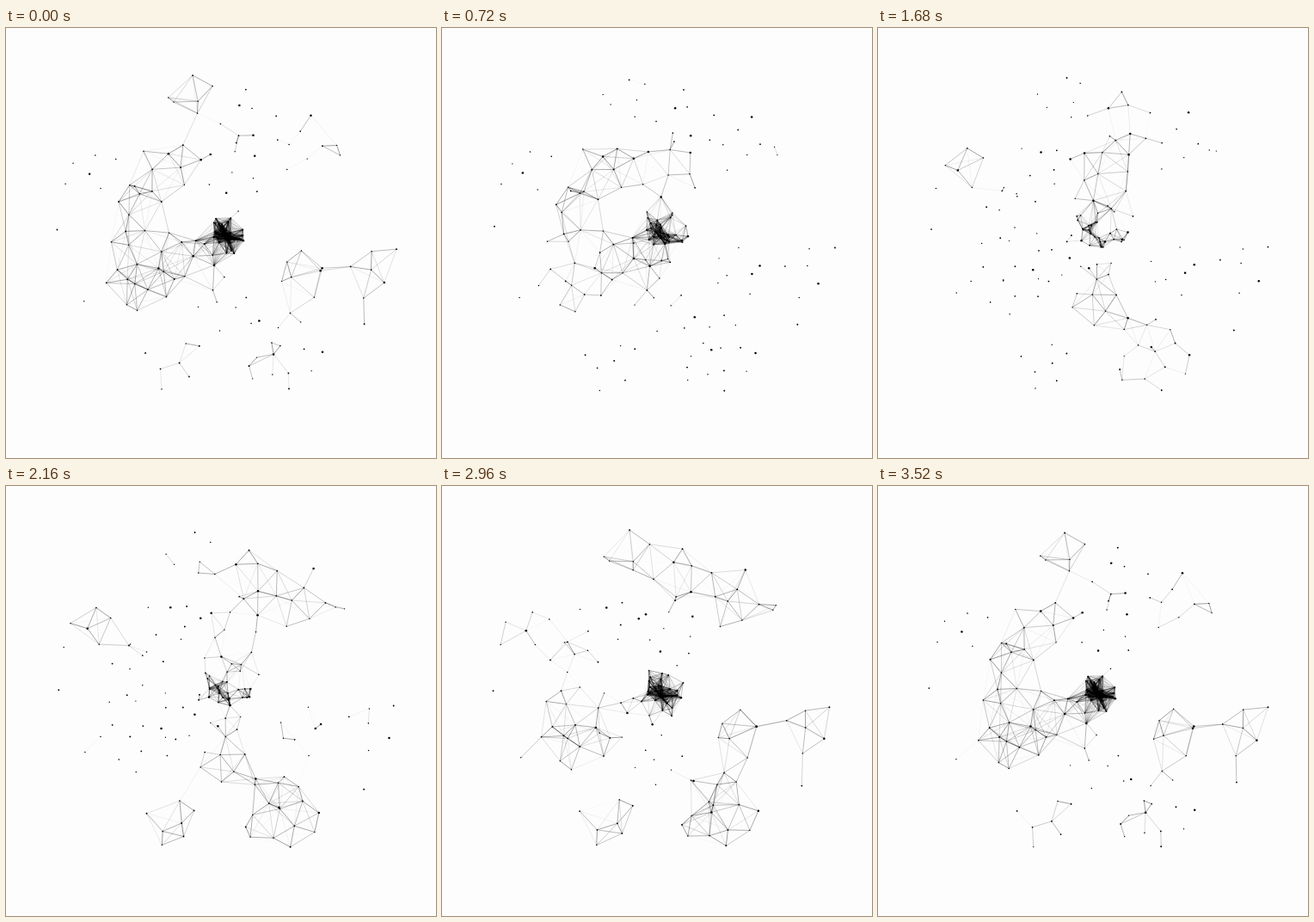
These frames come from a looping animation (500 px wide and 500 px high, 3600 ms). An HTML page with a canvas:

```html
<!DOCTYPE html>
<html lang="en">
<head>
<meta charset="utf-8">
<title>Drifting network</title>
<style>
  html, body { margin: 0; width: 100%; height: 100%; overflow: hidden; background: #fdfdfd; }
  canvas { display: block; }
</style>
</head>
<body>
<canvas id="stage" width="500" height="500"></canvas>
<script>
const ctx = document.getElementById("stage").getContext("2d");
const LOOP = 3600, STEP = 80, TAU = Math.PI * 2;
const GOLDEN_ANGLE = Math.PI * (3 - Math.sqrt(5));
const CENTER = { x: 253, y: 243 };
const REACH = 50;

// Each cluster links up most strongly at its peak time (ms).
const CLUSTERS = [
  { x: 212, y: 82, count: 6, peak: 3200 },
  { x: 288, y: 105, count: 8, peak: 2400 },
  { x: 345, y: 145, count: 5, peak: 2750 },
  { x: 192, y: 158, count: 8, peak: 500 },
  { x: 102, y: 165, count: 5, peak: 2100 },
  { x: 155, y: 215, count: 8, peak: 300 },
  { x: 152, y: 290, count: 13, peak: 3550 },
  { x: 215, y: 272, count: 7, peak: 300 },
  { x: 197, y: 390, count: 7, peak: 2750 },
  { x: 322, y: 378, count: 13, peak: 2500 },
  { x: 427, y: 275, count: 6, peak: 3150 },
  { x: 338, y: 284, count: 6, peak: 3050 },
  { x: 268, y: 175, count: 9, peak: 1400 },
  { x: 262, y: 322, count: 7, peak: 1700 }
];

let seed = 29;
function random() {
  seed = (seed * 16807) % 2147483647;
  return seed / 2147483647;
}
const between = (low, high) => low + random() * (high - low);
const clamp = value => Math.max(0, Math.min(1, value));
const wave = (time, peak) => Math.cos((time - peak) / LOOP * TAU);

const points = [];

function addPoint(x, y, peak, { bias = 0.52, swing = 0.75, breath = 0 } = {}) {
  points.push({
    x, y, peak, bias, swing, breath,
    driftX: between(1, 5), driftY: between(1, 5),
    peakX: random() * LOOP, peakY: random() * LOOP,
    size: random() < 0.15 ? 1.25 : between(0.65, 0.95)
  });
}

// An even, slightly loosened disc of points.
function addCluster({ x, y, count, peak }) {
  const spread = 14 * Math.sqrt(count);
  const turn = random() * TAU;
  for (let i = 0; i < count; i++) {
    const radius = spread * Math.sqrt((i + 0.5) / count);
    const angle = turn + i * GOLDEN_ANGLE;
    addPoint(
      x + radius * Math.cos(angle) + between(-5, 5),
      y + radius * Math.sin(angle) + between(-5, 5),
      peak + between(-150, 150)
    );
  }
}

function addRing(count, inner, outer, peakOf, style) {
  for (let i = 0; i < count; i++) {
    const radius = between(inner, outer);
    const angle = random() * TAU;
    addPoint(CENTER.x + radius * Math.cos(angle), CENTER.y + radius * Math.sin(angle), peakOf(), style);
  }
}

CLUSTERS.forEach(addCluster);
addRing(38, 2, 40, () => 3500, { bias: 0.5, swing: 0.1, breath: 0.3 });
addRing(14, 100, 195, () => between(2400, 3400));

function place(point, time) {
  const scale = 1 - point.breath * wave(time, 3500);
  return {
    x: CENTER.x + (point.x - CENTER.x) * scale + point.driftX * wave(time, point.peakX),
    y: CENTER.y + (point.y - CENTER.y) * scale + point.driftY * wave(time, point.peakY),
    size: point.size,
    reach: REACH * clamp(point.bias + point.swing * wave(time, point.peak))
  };
}

function drawLink(a, b) {
  const reach = (a.reach + b.reach) / 2;
  const distance = Math.hypot(a.x - b.x, a.y - b.y);
  if (distance >= reach) return;
  ctx.globalAlpha = Math.min(0.75, 1.3 * (1 - distance / reach));
  ctx.beginPath();
  ctx.moveTo(a.x, a.y);
  ctx.lineTo(b.x, b.y);
  ctx.stroke();
}

function drawDot(dot) {
  ctx.beginPath();
  ctx.arc(dot.x, dot.y, dot.size, 0, TAU);
  ctx.fill();
}

function draw(time) {
  ctx.globalAlpha = 1;
  ctx.fillStyle = "#fdfdfd";
  ctx.fillRect(0, 0, 500, 500);
  const dots = points.map(point => place(point, time));
  ctx.strokeStyle = "#000";
  ctx.lineWidth = 0.5;
  dots.forEach((a, i) => dots.slice(i + 1).forEach(b => drawLink(a, b)));
  ctx.globalAlpha = 1;
  ctx.fillStyle = "#000";
  dots.forEach(drawDot);
}

const start = performance.now();
function tick() {
  const elapsed = (performance.now() - start) % LOOP;
  draw(Math.floor(elapsed / STEP) * STEP);
  requestAnimationFrame(tick);
}
tick();
</script>
</body>
</html>
```
